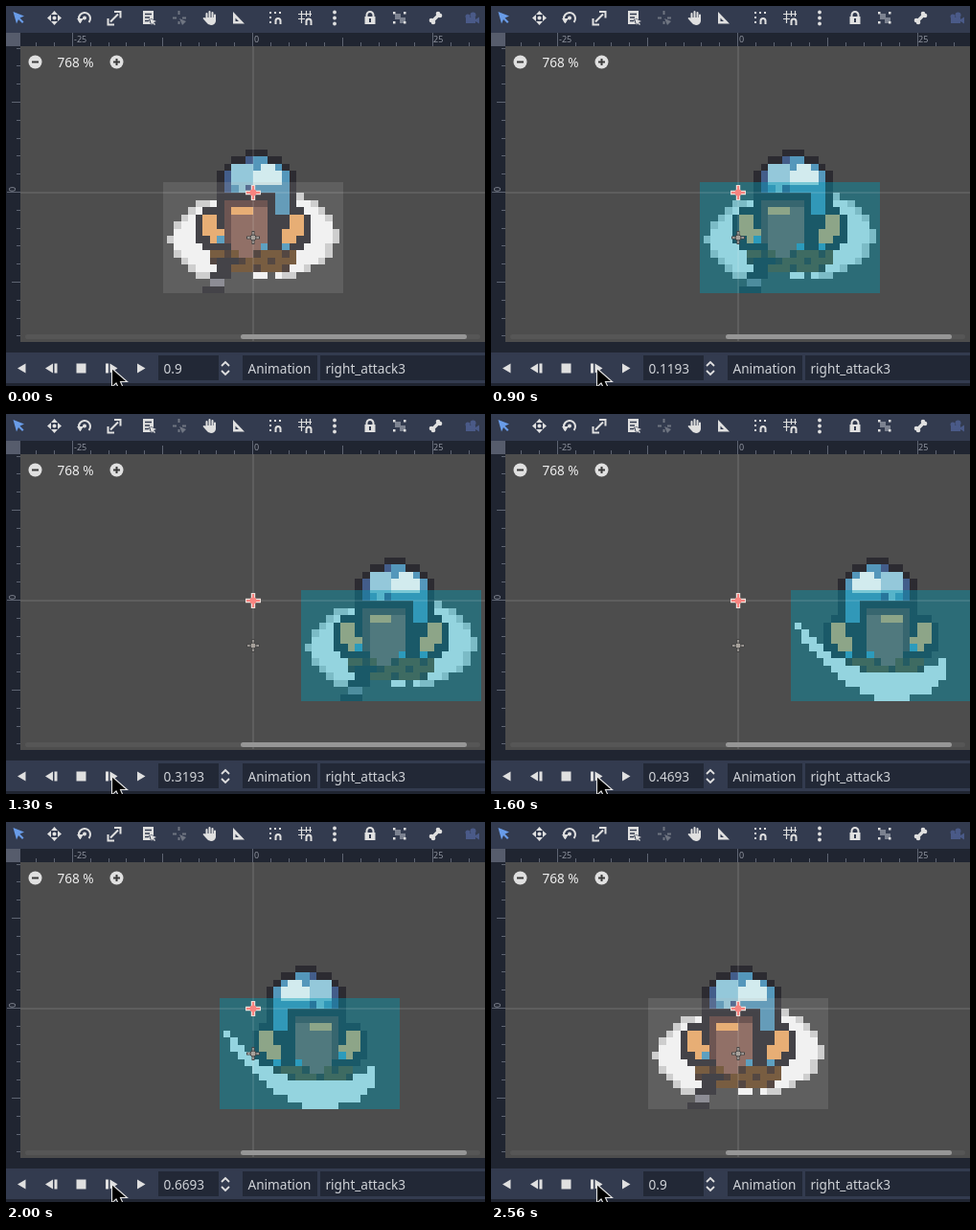
These frames come from a looping animation (500 by 397 pixels, 2.72 s). An HTML page with a canvas:

```html
<!DOCTYPE html>
<html lang="en">
<head>
<meta charset="utf-8">
<title>Sprite animation editor</title>
<style>
html, body { margin: 0; width: 100%; height: 100%; overflow: hidden; background: #4d4d4d; }
canvas, svg { position: absolute; left: 0; top: 0; display: block; }
text { font: 13.6px "Noto Sans", "Open Sans", sans-serif; fill: #d0d3d8; }
.small { font-size: 9px; fill: #9095a0; }
.icon { fill: #e0e0e0; }
.line { fill: none; stroke: #e0e0e0; stroke-width: 2; }
</style>
</head>
<body>
<canvas id="stage" width="500" height="397"></canvas>
<svg width="500" height="397" viewBox="0 0 500 397">
  <!-- axes and gizmos -->
  <path d="M258 42V350M15 195H500" stroke="#fff" stroke-opacity=".2"/>
  <path d="M250 195h16M258 187v16" stroke="#eeddd8" stroke-width="4.4"/>
  <path d="M251 195h14M258 188v14" stroke="#f88480" stroke-width="2"/>
  <circle cx="258" cy="195" r="3.4" fill="#f88480"/>
  <path d="M251 242h14M258 235v14" stroke="#444" stroke-width="3"/>
  <path d="M252 242h12M258 236v12" stroke="#b5b0aa" stroke-width="1.4"/>
  <circle cx="258" cy="242" r="3" fill="#a8a29c" stroke="#444"/>

  <!-- rulers -->
  <path d="M0 28H500V42H15V351H0Z" fill="#202531"/>
  <path d="M0 28H15V42H0Z" fill="#565c6c"/>
  <path id="ticks" stroke="#5e6472" fill="none"/>
  <text class="small" x="71" y="38">-25</text>
  <text class="small" x="259" y="38">0</text>
  <text class="small" x="446" y="38">25</text>
  <text class="small" transform="translate(10 194) rotate(-90)">0</text>

  <!-- zoom and scroll bar -->
  <g class="icon"><circle cx="30.500" cy="58.500" r="7"/><circle cx="115.500" cy="58.500" r="7"/></g>
  <path d="M27 58.500h7M112 58.500h7M115.500 55v7" stroke="#3b3b3b" stroke-width="2"/>
  <text x="53.500" y="63.500" style="fill:#eee">768 %</text>
  <rect x="20" y="343" width="475" height="5" rx="2.500" fill="#565656"/>
  <rect x="245" y="343" width="236" height="5" rx="2.500" fill="#969696"/>

  <!-- toolbar -->
  <path d="M0 0H500V28H0Z" fill="#333b4f"/>
  <path d="M7.500 6l11.500 4.500-4.500 2 4 4-1.500 1.500-4-4-2 4.500z" fill="#699ce8"/>
  <path class="icon" d="M50.500 5l3.500 4h-7zM50.500 20l3.500-4h-7zM43 12.500l4-3.500v7zM58 12.500l-4-3.500v7z"/>
  <circle class="icon" cx="50.500" cy="12.500" r="2"/>
  <path class="line" d="M78 17.500A6 6 0 1 1 86.500 17"/>
  <path class="icon" d="M74 13h7l-3.500 5zM80 12.500a2 2 0 1 1 4 0a2 2 0 1 1-4 0"/>
  <path class="line" d="M109 16.500l8-8M113 6h6.500v6.500M106.500 13v6.500h6.500"/>
  <path class="icon" d="M143 5h11v9l-3-1-2 1 2 5h-8z"/>
  <path d="M145 8.500h7M145 12h5M145 15.500h4" stroke="#333b4f" stroke-width="1.500"/>
  <path class="icon" d="M150 13l7 3-3 1 2 2-1 1-2-2-1 2z"/>
  <g opacity=".35"><path class="line" d="M180.500 5v4M180.500 16v3M174 12.500h4M184 12.500h4"/><path class="icon" d="M181 13l7 3-4 4z"/></g>
  <path class="line" d="M209.500 14V8M212.500 13V6M215.500 13V7M218 13V9.500" stroke-linecap="round"/>
  <path class="icon" d="M208.500 12h10.500v4q-1 4-5 4q-3 0-5-3l-3.500-4q1-2 3 0z"/>
  <path class="icon" fill-rule="evenodd" d="M237 6L249 18.500H237ZM239.500 12.500V16h3.500z"/>
  <path class="line" d="M281.500 19v-3.500a2.500 2.500 0 0 1 5 0v3.500"/>
  <path class="icon" d="M275 6h2v2h-2zM275 11h2v2h-2zM275 16h2v2h-2zM280 6h2v2h-2zM285 6h2v2h-2z"/>
  <path class="line" style="stroke-width:1.2" d="M308.500 5v13M313.500 5v6M305 8.500h14M305 13.500h7M317.500 5v6"/>
  <path class="line" d="M313.500 20v-4a2.500 2.500 0 0 1 5 0v4"/>
  <g class="icon"><circle cx="343" cy="6.500" r="1.900"/><circle cx="343" cy="12.500" r="1.900"/><circle cx="343" cy="18.500" r="1.900"/></g>
  <path class="line" d="M376.500 12V9.500a3.500 3.500 0 0 1 7 0V12"/>
  <path class="icon" fill-rule="evenodd" d="M374.500 11h11v8h-11zM379 13v4h2v-4z"/>
  <path d="M406 8h6v6h-6zM411 12h6v6h-6z" fill="#7c8290"/>
  <path class="icon" d="M404 6h2.500v2.500H404zM415 6h2.500v2.500H415zM404 16h2.500v2.500H404zM415 16h2.500v2.500H415z"/>
  <path d="M445 16l7-7" stroke="#e0e0e0" stroke-width="3.200"/>
  <g class="icon"><circle cx="451" cy="8" r="2.300"/><circle cx="453" cy="10" r="2.300"/><circle cx="444" cy="15" r="2.300"/><circle cx="446" cy="17" r="2.300"/></g>
  <g fill="#4a5a88"><circle cx="482" cy="11" r="2.500"/><circle cx="487.500" cy="9.500" r="3"/><path d="M480 12h10v6h-10zM490 14l4-2.500v7l-4-2.500z"/></g>

  <!-- animation panel -->
  <path d="M0 351H500V397H0Z" fill="#202531"/>
  <path d="M0 362H500V394H0Z" fill="#333b4f"/>
  <path d="M159 365H222V391H159ZM247 365H325V391H247ZM328 365H500V391H328Z" fill="#222836"/>
  <path class="icon" d="M20.500 373.500v10l-8.500-5zM49 373.500v10l-8-5zM50.500 373.500h3v10h-3zM73.500 373.500h10v10h-10zM104 373.500h3v10h-3zM108.500 373.500v10l8-5zM137 373.500v10l8.500-5z"/>
  <path class="line" style="stroke-width:1.8" d="M225 376l4-4 4 4M225 381l4 4 4-4"/>
  <text id="clock" x="164.500" y="383.500"></text>
  <text x="252.500" y="383.500">Animation</text>
  <text x="333.500" y="383.500">right_attack3</text>
  <path d="M110.500 378.500V398l4.500-4 3 6 4-2-2.500-5.500h7z" fill="#000" stroke="#e4e4e4" stroke-width="1.100"/>
</svg>
<script>
const g = document.getElementById('stage').getContext('2d');
const clock = document.getElementById('clock');
const CELL = 7.52, OX = 258, OY = 195;
const DARK = '#2c2b31';
let shift = 0, flip = false;

// Fills a block given in sprite cells.
function block(color, c, r, w = 1, h = 1) {
  const x = flip ? -c - w : c;
  const px = v => Math.round(OX + (v + shift) * CELL);
  const py = v => Math.round(OY + v * CELL);
  g.fillStyle = color;
  g.fillRect(px(x), py(r), px(x + w) - px(x), py(r + h) - py(r));
}

// Colours every cell for which the rule holds.
function fill(color, rule) {
  for (let y = -6; y < 14; y++)
    for (let x = -12; x < 12; x++) if (rule(x, y)) block(color, x, y);
}

const oval = (cx, cy, rx, ry) => (x, y) => ((x - cx) / rx) ** 2 + ((y - cy) / ry) ** 2 < 1;

function helmet() {
  const dome = oval(0, -0.5, 4.8, 4.8);
  const left = oval(-2, -2.8, 1.8, 1.8), right = oval(1.5, -2.8, 1.9, 1.8);
  const shell = (x, y) => dome(x, y) && y < 0;
  fill(DARK, (x, y) => y < 1 && oval(0, -0.5, 5.7, 5.7)(x, y));
  fill('#5497bb', shell);
  fill('#435d8a', (x, y) => shell(x, y) && (x === -4 || x === -1));
  fill('#94c8da', left);
  fill('#d2ebee', right);
  fill('#5497bb', (x, y) => x > 2 && x < 5 && y >= 0 && y < 3);
}

function dwarf() {
  const side = x => Math.abs(x + 0.5);
  const tunic = oval(-0.5, 8.5, 6, 2.4);
  fill(DARK, (x, y) => Math.abs(x) < 6 && y >= 0 && y < 9);
  fill(DARK, oval(-0.5, 4.6, 8.4, 4.6));
  fill('#f3ad68', (x, y) => y > 2 && y < 7 && Math.abs(side(x) - 6.2 + 0.35 * (y - 3)) < 1.1);
  fill('#6b4a28', (x, y) => y > 7 && tunic(x, y));
  fill('#3f3029', (x, y) => y > 7 && tunic(x, y) && (x + 2 * y) % 4 === 0);
  fill('#4b9cc3', (x, y) => y === 7 - (x < 0) && side(x) < 6 && (x + 5) % 3 === 0);

  const face = (x, y) => y > 0 && y < 9 && Math.abs(x + 1.5) < 3.2 - 0.6 * Math.max(0, y - 5);
  fill('#8a6257', face);
  fill('#5e413d', (x, y) => face(x, y) && (y === 1 || x === -4));
  fill('#f3ad68', (x, y) => y === 2 && x > -4 && x < 0);
  helmet();
}

function ring() {
  // The right half sits one cell higher than the left.
  const inside = size => (x, y) =>
    oval(-0.5, x < 0 ? 6 : 5.3, 11.6 * size, 6.7 * size)(x, y) && (y < 11 || x < -5 || x >= 0 && x !== 2);
  fill('#d4d4d4', inside(1));
  fill('#fff', inside(0.93));
}

function weapon() {
  const offset = (x, y) => Math.abs(x + 0.5 * y - 0.5);
  fill(DARK, (x, y) => y > 8 && offset(x, y) < 1.1);
  fill('#85858f', (x, y) => y === 12 && offset(x, y) < 1.1);
}

// A crescent between two parabolas.
function swipe() {
  fill('#fff', (x, y) => x < 9 && y <= 13.4 - 0.055 * (x - 1.3) ** 2 && y >= 9.9 - 0.043 * (x - 0.8) ** 2);
}

function draw(time) {
  const ms = time % 2720;
  const playing = ms >= 700 && ms < 2560;
  const step = Math.min(17, Math.floor((ms - 700) / 100));
  const s = !playing ? 0.9 : step ? 0.0193 + step * 0.05 : 0.0171;
  const active = s < 0.8;

  g.clearRect(0, 0, 500, 397);
  shift = 24 * Math.max(0, 1 - Math.abs(s / 0.4 - 1));
  if (active && Math.floor(s * 10) % 2 === 0) {
    flip = true;
    dwarf();
    flip = false;
    swipe();
  } else {
    ring();
    dwarf();
    weapon();
  }
  block(active ? 'rgba(0,153,179,.42)' : 'rgba(178,178,178,.18)', -12.5, -1.5, 25, 15.5);
  clock.textContent = playing ? s.toFixed(4) : '0.9';
  requestAnimationFrame(draw);
}

let ticks = '';
for (let i = -13; i < 14; i++) {
  const size = i % 10 === 0 ? 14 : i % 5 === 0 ? 9 : 4;
  const x = Math.round(OX + i * 2.5 * CELL) - 0.5, y = Math.round(OY + i * 2.5 * CELL) - 0.5;
  if (x > 15) ticks += `M${x} 42v${-size}`;
  if (y > 42 && y < 350) ticks += `M15 ${y}h${-size}`;
}
document.getElementById('ticks').setAttribute('d', ticks);
requestAnimationFrame(draw);
</script>
</body>
</html>
```
